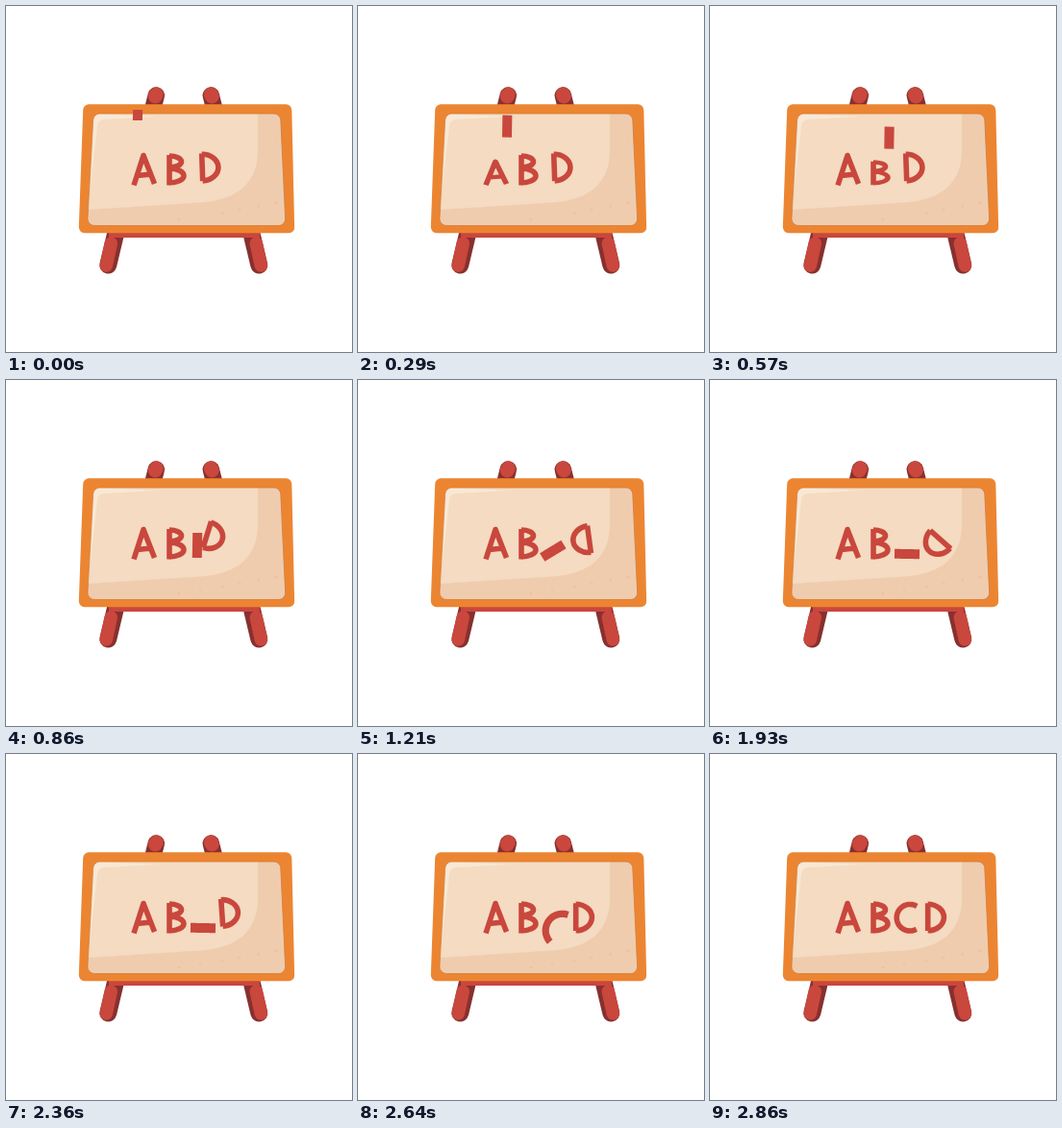
An HTML page with a canvas for the animation above (3.14 s loop, 360x360 px).

```html
<!DOCTYPE html>
<html lang="en">
<head>
<meta charset="utf-8">
<title>Alphabet board</title>
<style>
html, body { margin: 0; width: 100%; height: 100%; overflow: hidden; background: #fff; }
canvas { display: block; width: 360px; height: 360px; }
</style>
</head>
<body>
<canvas id="stage" width="360" height="360"></canvas>
<script>
const ctx = document.getElementById('stage').getContext('2d');
const LOOP = 3140, STEP = 1000 / 14, LAST_STEP = 40;
const RED = '#c9473d', DARK = '#87302f', ORANGE = '#ec8532';
const STROKE = 5.6;

const lerp = (a, b, u) => a + (b - a) * u;
const phase = (t, start, end) => Math.min(1, Math.max(0, (t - start) / (end - start)));
const smooth = u => u * u * (3 - 2 * u);
const arch = u => 4 * u * (1 - u);
const rad = degrees => degrees * Math.PI / 180;

function capsule(x0, y0, x1, y1, width, color) {
  ctx.beginPath();
  ctx.moveTo(x0, y0);
  ctx.lineTo(x1, y1);
  ctx.lineCap = 'round';
  ctx.lineWidth = width;
  ctx.strokeStyle = color;
  ctx.stroke();
}

function legs() {
  for (const side of [1, -1]) {
    ctx.save();
    ctx.translate(184.8, 0);
    ctx.scale(side, 1);
    capsule(-28.5, 93, -32, 107, 17.5, DARK);
    capsule(-28.5, 92, -29.5, 94, 15, RED);
    capsule(-70.5, 236, -78.5, 269.5, 18, DARK);
    capsule(-75.5, 247, -80.5, 270, 13.5, RED);
    ctx.restore();
  }
  ctx.fillStyle = RED;
  ctx.fillRect(107, 233, 157, 8);
}

// A four-sided panel, slightly wider at its foot.
function panel(top, bottom, [left, right], [footLeft, footRight], radius) {
  const corners = [[left, top], [right, top], [footRight, bottom], [footLeft, bottom]];
  ctx.beginPath();
  ctx.moveTo((left + right) / 2, top);
  for (let i = 1; i <= 4; i++) ctx.arcTo(...corners[i % 4], ...corners[(i + 1) % 4], radius);
  ctx.closePath();
}

function specks() {
  let seed = 11;
  const random = () => (seed = seed * 16807 % 2147483647) / 2147483647;
  ctx.fillStyle = '#eec2a5';
  for (let i = 0; i < 6; i++) {
    ctx.beginPath();
    ctx.ellipse(180 + 20 * i + 6 * random(), 222 - 3.4 * i, 1 + 1.5 * random(), 1.3, 0, 0, 7);
    ctx.fill();
  }
}

function board() {
  panel(102.3, 236.3, [80.4, 297.2], [75.6, 300.3], 6);
  ctx.fillStyle = ORANGE;
  ctx.fill();

  const paper = () => panel(112, 228.5, [91, 285.5], [84.5, 291], 7);
  paper();
  ctx.fillStyle = '#efccae';
  ctx.fill();
  ctx.save();
  ctx.clip();

  ctx.beginPath();
  ctx.moveTo(80, 212.3);
  ctx.lineTo(202, 204.5);
  ctx.bezierCurveTo(242, 202, 262, 183, 262, 150);
  ctx.lineTo(262, 110);
  ctx.lineTo(80, 110);
  ctx.fillStyle = '#f4dbc1';
  ctx.fill();

  ctx.beginPath();
  ctx.moveTo(88, 190);
  ctx.lineTo(95, 125);
  ctx.quadraticCurveTo(96, 118, 103, 118);
  ctx.lineTo(160, 115);
  ctx.lineTo(91, 112);
  ctx.fillStyle = '#f8e8d4';
  ctx.fill();
  specks();
  ctx.restore();

  paper();
  ctx.strokeStyle = '#d57a36';
  ctx.lineWidth = .8;
  ctx.stroke();
}

function glyph(path, x, y, angle = 0, squash = 1) {
  ctx.save();
  ctx.translate(x, y);
  ctx.rotate(rad(angle));
  ctx.scale(1, squash);
  ctx.lineWidth = STROKE;
  ctx.lineCap = 'butt';
  ctx.lineJoin = 'round';
  ctx.strokeStyle = RED;
  ctx.stroke(path);
  ctx.restore();
}

// Letters with bowls are a stem plus half ellipses, each [y, width, half height].
function bowls(stem, foot, ...list) {
  const path = new Path2D();
  for (const [y, width, half] of list) {
    path.moveTo(stem, y - half);
    path.ellipse(stem, y, width, half, 0, -Math.PI / 2, Math.PI / 2);
  }
  path.moveTo(stem, foot);
  path.lineTo(stem, list[0][0] - list[0][2] - 1);
  return path;
}

// A and B stand on their baseline; D turns around its centre.
const A = new Path2D('M-10.5 1 L-.5 -30 L11 -.5 M-7 -9 L7.5 -10.5');
const B = bowls(-7, 1, [-23.5, 12.5, 6], [-9, 15, 7.5]);
const D = bowls(-8.3, 14, [0, 16.7, 13.8]);

// A strip of constant curvature around its midpoint: straight it is a block, curled a C.
function strip(x, y, heading, length, width, sweep) {
  const pieces = 32, half = length / 2;
  ctx.beginPath();
  for (let i = 0; i <= pieces; i++) {
    const s = i / pieces * 2 - 1, turn = s * sweep / 2;
    const chord = turn ? half * s * Math.sin(turn / 2) / (turn / 2) : half * s;
    const angle = heading - turn / 2;
    ctx.lineTo(x + chord * Math.cos(angle), y + chord * Math.sin(angle));
  }
  ctx.lineCap = 'butt';
  ctx.lineJoin = 'round';
  ctx.lineWidth = width;
  ctx.strokeStyle = RED;
  ctx.stroke();
}

// The block drops onto A, hops to B and dives into the gap before D.
const stops = [
  { at: 0, x: 137, y: 113.5 },
  { at: 215, x: 146, y: 139, hop: 2 },
  { at: 500, x: 183, y: 143, hop: 20 },
  { at: 830, x: 199, y: 172, hop: 18 }
];

function blockPlace(t) {
  const next = Math.max(1, stops.findIndex(stop => stop.at >= t));
  const to = t >= 830 ? stops[3] : stops[next];
  const from = stops[stops.indexOf(to) - 1];
  const u = phase(t, from.at, to.at);
  return [lerp(from.x, to.x, u), lerp(from.y, to.y, u) - to.hop * arch(u)];
}

function drawBlock(t) {
  const [x, y] = blockPlace(t);
  const tip = phase(t, 950, 1280) ** 2;
  const curl = smooth(phase(t, 2430, 2790));
  const length = lerp(11, 23, phase(t, 0, 215)) + 3 * phase(t, 570, 860);
  strip(
    lerp(x + 6 * tip, 194.2, curl),
    lerp(y + 9 * tip, 170, curl),
    rad(91 + 90 * tip * (1 - curl)),
    lerp(length, 58, curl),
    lerp(10, STROKE, curl),
    4.2 * curl
  );
}

// D is knocked over to the right, rolls back upright and ends with a small jump.
function drawD(t) {
  const fall = phase(t, 750, 1280), roll = phase(t, 1550, 2290);
  const jump = phase(t, 2150, 2400), settle = smooth(phase(t, 2400, 2600));
  glyph(
    D,
    lerp(212.5, 235, fall) - 2 * smooth(roll) + 2 * settle,
    lerp(167.8, 170, fall) - 7 * arch(fall) + 2 * Math.sin(Math.PI * roll) - 9 * arch(jump),
    -2 + 182 * smooth(fall) - 184 * roll ** 2 + 4 * settle
  );
}

const squash = (t, at) => 1 - .27 * Math.exp(-(((t - at) / 80) ** 2));

function draw(t) {
  ctx.fillStyle = '#fff';
  ctx.fillRect(0, 0, 360, 360);
  legs();
  board();
  glyph(A, 143.5, 185.5, 0, squash(t, 245));
  glyph(B, 177, 185.5, 0, squash(t, 535));
  drawD(t);
  drawBlock(t);
}

const start = performance.now();
function tick() {
  const t = (performance.now() - start) % LOOP;
  // Poses advance at fourteen per second, then the last one holds.
  draw(Math.min(LAST_STEP, Math.floor((t + 5) / STEP)) * STEP);
  requestAnimationFrame(tick);
}
tick();
</script>
</body>
</html>
```
